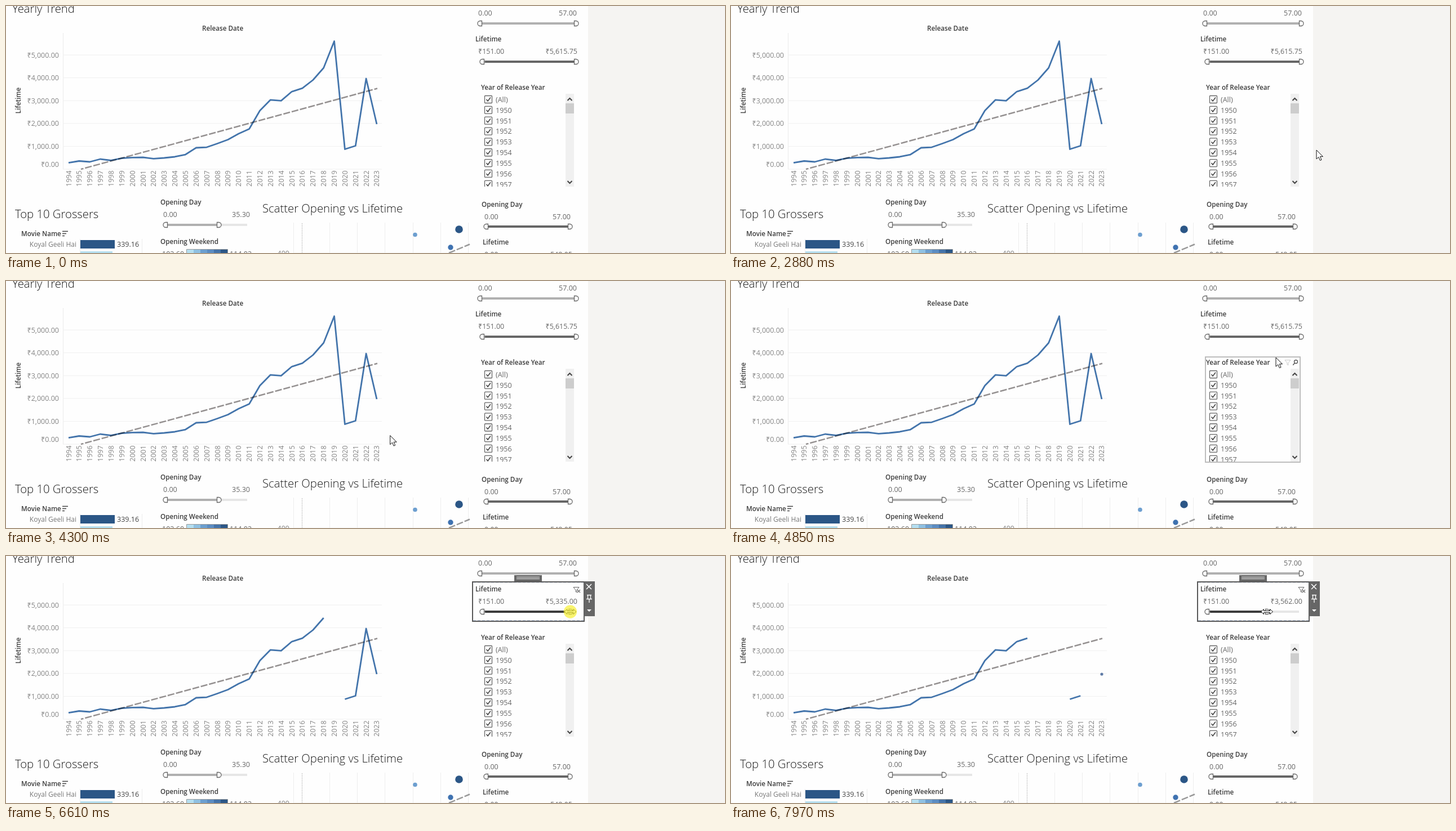
Write an HTML page that moves like this. It is 1276 px wide and 439 px high and loops after 8000 ms.

```html
<!DOCTYPE html>
<html lang="en">
<head>
<meta charset="utf-8">
<title>Yearly Trend dashboard</title>
<style>
  html, body { margin: 0; width: 100%; height: 100%; overflow: hidden; background: #fff; }
  svg { display: block; width: 100vw; height: 100vh; font: 12.5px "Open Sans", "Noto Sans", sans-serif; fill: #666; }
  .bold { font-size: 11.7px; font-weight: 600; fill: #3c3c3c; }
  .title { font-size: 20.3px; font-weight: 340; fill: #1c1c1c; }
  .axis { fill: #858585; }
  .name { font-size: 12px; fill: #787878; }
</style>
</head>
<body>
<svg viewBox="0 0 1276 439">
  <defs><clipPath id="listClip"><rect x="841" y="134" width="170" height="187"/></clipPath></defs>
  <g id="base"></g>
  <g id="live"></g>
</svg>
<script>
const LOOP = 8000;
const BLUE = '#4374ab', NAVY = '#2b5686', DARK = '#666', MID = '#b0b0b0', PALE = '#e6e6e6';
const MAX_LIFETIME = 5615.75;
const byYear = [283, 357, 320, 443, 382, 480, 510, 517, 461, 493, 542, 640, 936, 960, 1121,
  1293, 1552, 1761, 2562, 3034, 2997, 3392, 3545, 3904, 4433, 5603, 874, 1022, 3965, 1970];

const yearX = i => 111 + i * 18.862;
const valueY = v => 290 - v * 0.0406;
const money = v => '₹' + v.toLocaleString('en-US', { minimumFractionDigits: 2, maximumFractionDigits: 2 });
const range = n => [...Array(n).keys()];

// SVG helpers
const text = (x, y, s, cls = '', more = '') => `<text x="${x}" y="${y}" class="${cls}" ${more}>${s}</text>`;
const textEnd = (x, y, s, cls) => text(x, y, s, cls, 'text-anchor="end"');
const rect = (x, y, w, h, fill, more = '') => `<rect x="${x}" y="${y}" width="${w}" height="${h}" fill="${fill}" ${more}/>`;
const path = (d, stroke, width = 1, more = '') =>
  `<path d="${d}" fill="none" stroke="${stroke}" stroke-width="${width}" ${more}/>`;
const dot = (x, y, r, fill) => `<circle cx="${x}" cy="${y}" r="${r}" fill="${fill}"/>`;
const frame = (x, y, w, h, color) => rect(x, y, w, h, 'none', `stroke="${color}" stroke-width="2"`);
const rail = (x0, x1, y, color) => path(`M${x0} ${y}H${x1}`, color, 4);
const handle = (x, y, dir) =>
  path(`M${x + dir * -3.5} ${y - 4.5}h${dir * 3}a4.5 4.5 0 0 ${dir > 0 ? 1 : 0} 0 9h${dir * -3}z`, DARK, 1.3, 'style="fill:#fff"');
const slider = (x0, x1, y, color) => rail(x0, x1, y, color) + handle(x0, y, -1) + handle(x1, y, 1);

function yearlyTrend() {
  const grid = range(6).map(i => path(`M101 ${valueY(i * 1000)}H667`, '#f0f0f0')).join('');
  const labels = range(6).map(i => textEnd(94, i ? valueY(i * 1000) + 4.5 : 285.5, money(i * 1000), 'axis')).join('');
  return text(11, 12, 'Yearly Trend', 'title') + text(348, 44, 'Release Date', 'bold')
    + text(0, 0, 'Lifetime', 'bold', 'transform="translate(26 168) rotate(-90)" text-anchor="middle"')
    + grid + path('M101.5 48V290', '#ececec') + labels;
}

function topGrossers() {
  const shades = ['#b5dff0', '#8fc0e2', '#6c9fcf', '#5b8cc2', '#4473a9', NAVY];
  return text(16, 377, 'Top 10 Grossers', 'title') + text(27, 409, 'Movie Name', 'bold')
    + path('M100 400.5h10M100 404.5h7M100 408.5h4', '#444', 1.5)
    + path('M131.5 414V439M241.5 414V439', '#ececec')
    + textEnd(125, 428, 'Koyal Geeli Hai', 'name')
    + rect(132, 416, 61, 15, NAVY) + rect(132, 436, 57, 3, '#b5dff0') + text(197, 428, '339.16', '', 'fill="#444"')
    + text(274, 353, 'Opening Day', 'bold') + text(279, 375, '0.00') + textEnd(433, 375, '35.30')
    + rail(378, 428, 389, PALE) + slider(283, 378, 389, MID)
    + text(274, 423, 'Opening Weekend', 'bold') + text(277, 445, '102.60') + text(397, 445, '114.02')
    + shades.map((c, i) => rect(321 + i * 12, 433, 12, 6, c)).join('') + path('M320.5 439V432.5H393.5V439', '#999');
}

function scatter() {
  return text(455, 367, 'Scatter Opening vs Lifetime', 'title')
    + [510, 574, 623, 672, 722, 771, 820].map(x => path(`M${x}.5 385V439`, '#eee')).join('')
    + path('M525.5 386V439', '#aaa', 1, 'stroke-dasharray="1.5 1.5"')
    + textEnd(503, 444, '400', 'axis') + path('M510 439H822', '#eee')
    + path('M786 439L823 423.5', '#999', 2.5, 'stroke-dasharray="12 3"')
    + dot(726, 406.5, 3.8, '#6d9fd0') + dot(804, 397, 6.8, NAVY) + dot(789, 429, 4.7, '#3f72b0');
}

function filters() {
  const checks = range(9).map(i => {
    const y = 166 + i * 18.85;
    return rect(849.5, y - 6.5, 13, 13, '#fff', 'rx="1" stroke="#666" stroke-width="1.3"')
      + path(`M852.5 ${y}l2.6 3 4.8-6.5`, '#444', 1.6) + text(869, y + 4.8, i ? 1949 + i : '(All)');
  }).join('');
  return text(838, 17, '0.00') + textEnd(1013, 17, '57.00') + slider(841, 1012, 31, MID)
    + text(833, 63, 'Lifetime', 'bold') + text(838, 85, '₹151.00')
    + text(843, 149, 'Year of Release Year', 'bold') + `<g clip-path="url(#listClip)">${checks}</g>`
    + rect(993, 156, 15, 165, '#f0f0f0') + rect(993, 173, 15, 18, '#cdcdcd')
    + path('M996.5 168l4-4 4 4M996.5 311l4 4 4-4', '#444', 2)
    + text(844, 357, 'Opening Day', 'bold') + text(849, 379, '0.00') + textEnd(1002, 379, '57.00')
    + slider(852, 1001, 392, DARK)
    + text(846, 424, 'Lifetime', 'bold') + text(849, 446, '0.00') + textEnd(1005, 446, '548.05');
}

// Pointer moves: first step, last step, step count, end x, y and slider value
const moves = [
  [0, 0, 1, 1212, 445],
  [450, 790, 6, 1131, 221],
  [1000, 1330, 6, 1163, 208],
  [1530, 1600, 2, 1225, 242],
  [2880, 2880, 1, 1039, 256],
  [2950, 3220, 5, 600, 345],
  [3370, 3370, 1, 582, 306],
  [3500, 3500, 1, 636, 301],
  [3570, 3640, 2, 650, 290],
  [4240, 4850, 10, 967, 136],
  [4910, 4980, 2, 970, 121],
  [5050, 5120, 2, 983, 105],
  [5320, 5920, 9, 1010, 99],
  [6480, 7090, 10, 967, 99, 4212],
  [7160, 7160, 1, 965, 99, 4147],
  [7230, 7500, 4, 951, 99, 3562],
];

function pointerAt(t) {
  let at = [1212, 445, MAX_LIFETIME];
  for (const [start, end, steps, x, y, value = MAX_LIFETIME] of moves) {
    if (t < start) break;
    const step = end > start ? Math.floor((t - start) / (end - start) * (steps - 1) + 0.01) + 1 : 1;
    const p = Math.min(1, step / steps);
    at = [x, y, value].map((v, i) => at[i] + (v - at[i]) * p);
  }
  return at;
}

function trendLine(limit) {
  let d = '', dots = '';
  const shown = i => byYear[i] <= limit;
  byYear.forEach((v, i) => {
    if (!shown(i)) return;
    d += `${shown(i - 1) ? 'L' : 'M'}${yearX(i)} ${valueY(v)}`;
    if (!shown(i - 1) && !shown(i + 1)) dots += dot(yearX(i), valueY(v), 2.6, '#5f7ba6');
  });
  return path(d, BLUE, 2.8, 'stroke-linejoin="round"') + dots
    + path('M133 290L659 146.5', '#969292', 2.4,
      'stroke-dasharray="12.2 3" stroke-dashoffset="22.8" style="mix-blend-mode:multiply"');
}

const yearLabels = active => byYear.map((_, i) => text(0, 0, 1994 + i, 'axis',
  `transform="translate(${yearX(i) + 4.5} 321) rotate(-90)" ${1994 + i === active ? 'style="fill:#333"' : ''}`)).join('');

function lifetimeSlider(t, x, value) {
  const dragged = t >= 6480;
  const knob = dragged ? x + 1 : 1012;
  return textEnd(1014, 85, money(value)) + rail(845, 853, 99, MID)
    + rail(knob, 1008, 99, t < 7970 ? DARK : PALE) + rail(850, knob, 99, DARK)
    + (dragged ? path(`M850 98H${knob}M851 100H${knob}`, '#111', 2, 'stroke-dasharray="1 1"') : '')
    + handle(845, 99, -1) + handle(knob, 99, 1);
}

const funnel = (x, y, color) => path(`M${x - 5} ${y - 4.5}h10l-4 5v4l-2 -1v-3z`, color);

function lifetimePanel(selected) {
  let out = path('M829 47H1025M829 114.5H1025', '#b9c6da', 1, 'stroke-dasharray="5 3"')
    + frame(828, 46, 198, 70, selected ? '#595959' : '#b4b6bd')
    + funnel(1012, 60, DARK) + path('M1014 60l5 5m0-5l-5 5', DARK, 1.2);
  if (selected) {
    out += rect(902, 34, 49, 11, DARK) + path('M906 37.5h41M906 40.5h41', '#fff')
      + rect(1026, 45, 19, 62, DARK) + path('M1030 50l9 9m0-9l-9 9', '#fff', 1.5)
      + path('M1031 69.5h8M1032.5 70v6M1037.5 70v6M1030 76.5h10M1035 77v6', '#fff', 1.3)
      + '<path d="M1031 95h8l-4 4z" fill="#fff"/>';
  }
  return out;
}

function hoverPanels(x, y, t) {
  const inside = (x0, y0, x1, y1) => x > x0 && x < x1 && y > y0 && y < y1;
  if (t < 2880) return '';
  if (inside(5, 0, 668, 322)) {
    return frame(5, -4, 663, 327, '#bdbdbd')
      + rect(98.5, 301.5, 9, 9, '#fff', 'stroke="#777"') + path('M100.5 306h5M103 303.5v5', '#555');
  }
  if (inside(446, 340, 830, 439)) return frame(447, 341, 382, 110, '#bdbdbd');
  if (inside(841, 134, 1010, 322)) {
    return frame(842, 135, 168, 187, '#bdbdbd') + funnel(988, 145, '#ccc')
      + '<circle cx="1002.5" cy="143.5" r="3" fill="none" stroke="#555" stroke-width="1.3"/>'
      + path('M1000.3 146l-3 3.5', '#555', 1.5);
  }
  return '';
}

function pointer(t, x, y) {
  const resizing = t >= 5320 && x > 1003 || t >= 5920;
  const shape = resizing
    ? 'M-10.5 0l5-4.5v3h11v-3l5 4.5-5 4.5v-3h-11v3z'
    : 'M0 0V16L3.8 12.5 6.4 18.5 9 17.4 6.5 11.6H11.5Z';
  return `<path d="${shape}" transform="translate(${x} ${y})" fill="#fff" stroke="#111"/>`
    + (t >= 6410 && t < 7500 ? `<circle cx="${x}" cy="${y}" r="11.7" fill="#f6f032" opacity=".7"/>` : '');
}

function scene(t) {
  const [x, y, value] = pointerAt(t);
  const active = t >= 3370 && t < 3570 ? 2019 : 0;
  return trendLine(value) + yearLabels(active) + hoverPanels(x, y, t)
    + lifetimeSlider(t, x, value) + (t >= 5320 ? lifetimePanel(t >= 6480) : '')
    + (t >= 450 ? pointer(t, x, y) : '');
}

const base = document.getElementById('base'), live = document.getElementById('live');
base.innerHTML = rect(0, 0, 1276, 439, '#fefefe') + rect(1033, 0, 243, 439, '#f5f4f2')
  + yearlyTrend() + topGrossers() + scatter() + filters();

let drawn = '';
function draw() {
  const next = scene(performance.now() % LOOP);
  if (next !== drawn) live.innerHTML = drawn = next;
  requestAnimationFrame(draw);
}
draw();
</script>
</body>
</html>
```
